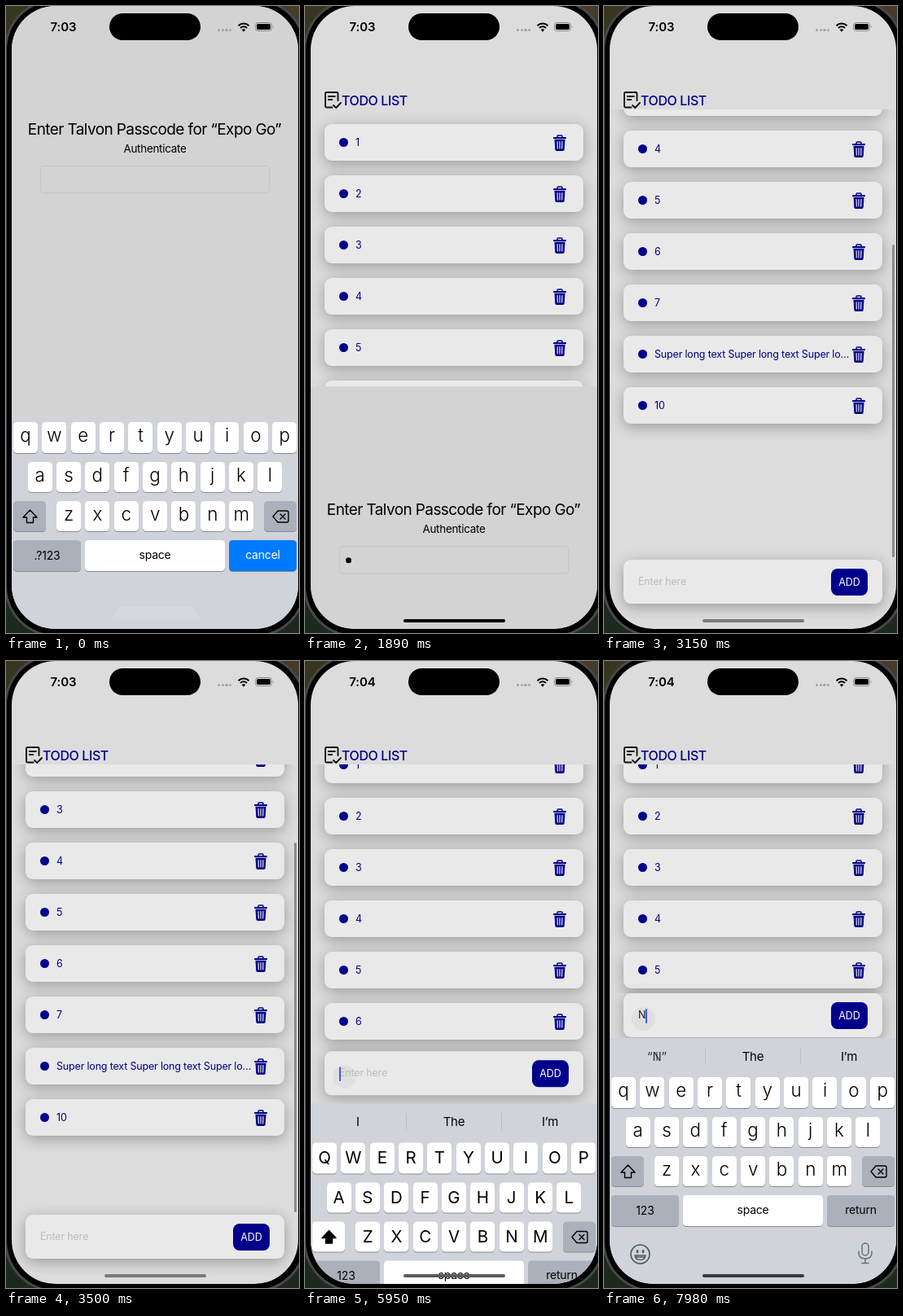
An HTML page for the animation above (8000 ms loop, 360 px wide and 770 px high).

```html
<!DOCTYPE html>
<html lang="en">
<head>
<meta charset="utf-8">
<title>Todo list</title>
<style>
html, body { margin: 0; width: 100%; height: 100%; overflow: hidden; }
body { font-family: Inter, Roboto, sans-serif; background: linear-gradient(100deg, #37351f, #4b3d2c); }
div, svg { position: absolute; box-sizing: border-box; white-space: nowrap; }
svg { overflow: visible; fill: none; stroke-linecap: round; stroke-linejoin: round; }
#stage { left: 0; top: 0; width: 360px; height: 770px; overflow: hidden; }
#ground { left: 0; top: 385px; width: 360px; height: 385px; background: #1c2a1d; }
#bezel { left: .5px; top: -6.5px; width: 365px; height: 778px; border-radius: 60px; background: #000; box-shadow: 0 0 0 3px #48484a; }
#screen { left: 7px; top: 0; width: 352px; height: 765px; border-radius: 54px; overflow: hidden; background: #dcdcdc; }
#view { left: -7px; top: 0; width: 360px; height: 770px; }
.mid { text-align: center; }
.card { border-radius: 9px; background: #e9e9e9; box-shadow: 0 4px 17px rgba(0,0,0,.3); }
.navy { color: #00008b; }
.small { font-size: 12.5px; letter-spacing: -.18px; }
.key { border-radius: 4.5px; background: #fff; box-shadow: 0 1px 0 #898b90; color: #000; text-align: center; font-size: 14px; letter-spacing: -.2px; }
.grey { background: #abb0bb; }
.blue { background: #007aff; color: #fff; }
.caret { background: #3d5fe0; border-radius: 1px; }
</style>
</head>
<body>
<div id="stage">
  <div id="ground"></div>
  <div id="bezel"></div>
  <div id="screen"><div id="view"></div></div>
</div>
<script>
const view = document.getElementById('view');

function box(parent, x, y, w, h, cls = '', text = '', css = '') {
  const d = document.createElement('div');
  d.className = cls;
  d.style.cssText = `left:${x}px;top:${y}px;width:${w}px;height:${h}px;line-height:${h}px;${css}`;
  d.textContent = text;
  parent.append(d);
  return d;
}

function icon(parent, x, y, w, h, body, attrs = '') {
  parent.insertAdjacentHTML('beforeend',
    `<svg style="left:${x}px;top:${y}px" width="${w}" height="${h}" viewBox="0 0 ${w} ${h}" ${attrs}>${body}</svg>`);
  return parent.lastElementChild;
}

const show = (node, on) => { node.style.display = on ? '' : 'none'; };
const shiftY = (node, y) => { node.style.transform = `translateY(${y}px)`; };
const clamp = v => Math.min(1, Math.max(0, v));
const span = (t, a, b) => clamp((t - a) / (b - a));
const smooth = p => p * p * (3 - 2 * p);
const easeOut = p => 1 - (1 - p) ** 3;
const mix = (a, b, p) => a + (b - a) * p;

function track(points, t) {
  let i = points.findIndex(p => p[0] > t);
  if (i === 0) return points[0][1];
  if (i < 0) return points[points.length - 1][1];
  const [t0, a] = points[i - 1], [t1, b] = points[i];
  return mix(a, b, (t - t0) / (t1 - t0));
}

// List
const LIST_TOP = 127, LIST_H = 553, PITCH = 63;
const allItems = ['1', '2', '3', '4', '5', '6', '7', 'Super long text Super long text Super lo…', '10'];
const fewerItems = allItems.filter(s => s !== '7');
const maxScroll = n => n * PITCH + 89 - LIST_H;

const TRASH = `<path d="M5 4V2Q5 .9 6 .9h4q1 0 1 1.100V4" stroke="#00008b" stroke-width="1.500"/>
<path d="M1 3h14a1 1 0 0 1 0 2.200H1A1 1 0 0 1 1 3zM1.500 6h13l-.8 12.200q-.1 1.800-1.800 1.800H4.100q-1.700 0-1.800-1.800z" fill="#00008b"/>
<path d="M5.100 8.500l.2 8.500M8 8.500V17M10.900 8.500l-.2 8.500" stroke="#e9e9e9" stroke-width="1.200"/>`;

const list = box(view, 0, LIST_TOP, 360, LIST_H, '', '', 'overflow:hidden');
const rows = box(list, 0, -LIST_TOP, 360, 770);
const cards = allItems.map((_, i) => {
  const card = box(rows, 24, 145 + i * PITCH, 318, 45, 'card');
  box(card, 18, 17, 11, 11, '', '', 'border-radius:50%;background:#00008b');
  return {
    card,
    label: box(card, 38, 0, 245, 45, 'navy small'),
    trash: icon(card, 281, 12.5, 16, 20, TRASH)
  };
});
const bar = box(view, 354, 0, 2.7, 0, '', '', 'border-radius:2px;background:#8b8b8b');

// Header
icon(view, 24, 105, 21, 21,
  '<path d="M16.500 11V2.500Q16.500 1 15 1H2.500Q1 1 1 2.500v15.500Q1 19.500 2.500 19.500h7M4.800 6h8M4.800 10h4.500M11 17l3.200 3L20 14"/>',
  'stroke="#111" stroke-width="1.900"');
box(view, 45, 104, 100, 24, 'navy', 'TODO LIST', 'font-size:16px;font-weight:500;letter-spacing:-.4px');

// Entry field
const entry = box(view, 24, 680, 318, 54, 'card');
const touch = box(entry, 10, 17, 29, 29, '', '', 'border-radius:50%;background:rgba(0,0,0,.04)');
const hint = box(entry, 18, 0, 100, 54, 'small', 'Enter here', 'color:#bcbcbc');
const typed = box(entry, 18, 0, 30, 54, 'small', 'N', 'color:#1c1c1c');
const caret = box(entry, 18, 18.5, 1.8, 18, 'caret');
box(entry, 255, 10.5, 45, 33, 'mid', 'ADD', 'font-size:12.5px;color:#fff;background:#00008b;border-radius:8px');

// Passcode sheet
const sheet = box(view, 0, 0, 360, 770, '', '', 'background:#d3d3d3');
box(sheet, 0, 138, 365, 28, 'mid', 'Enter Talvon Passcode for “Expo Go”', 'font-size:19px;letter-spacing:-.6px');
box(sheet, 0, 165, 366, 20, 'mid', 'Authenticate', 'font-size:13.4px;letter-spacing:-.25px');
box(sheet, 42, 196, 282, 34, '', '', 'border:1px solid #c5c5c5;border-radius:4px');
const codeCaret = box(sheet, 48.5, 203, 2, 19, 'caret');
const codeDot = box(sheet, 49.5, 209.5, 7, 7, '', '', 'border-radius:50%;background:#000');

// Keyboards
const SHIFT = 'M9.500 1L18 10h-4.500v6.500h-8V10H1z';
const letterRows = [['qwertyuiop', 9, 511], ['asdfghjkl', 26.5, 559.5], ['zxcvbnm', 62, 607.5]];

function keyboard({ top, upper, left, right, rightCls }) {
  const kb = box(view, 0, 0, 360, 770);
  box(kb, 0, top, 360, 800 - top, '', '', 'background:#d0d3da');
  const style = upper
    ? 'font-size:20.5px;line-height:38px'
    : 'font-size:22.4px;font-weight:300;line-height:31px';
  for (const [letters, x, y] of letterRows)
    [...letters].forEach((c, i) =>
      box(kb, x + i * 35.35, y, 30, 37.5, 'key', upper ? c.toUpperCase() : c, style));
  box(kb, 9, 607.5, 40, 37.5, upper ? 'key' : 'key grey');
  icon(kb, 19.5, 618, 19, 18, `<path d="${SHIFT}" fill="${upper ? '#000' : 'none'}"/>`, 'stroke="#000" stroke-width="1.400"');
  box(kb, 317, 607.5, 40, 37.5, 'key grey');
  icon(kb, 327, 618.5, 21, 16,
    '<path d="M7 1h11q2 0 2 2v10q0 2-2 2H7L1 8zM10 5l6 6M16 5l-6 6"/>', 'stroke="#000" stroke-width="1.400"');
  box(kb, 9, 656, 83, 37.5, 'key grey', left);
  box(kb, 97, 656, 172, 37.5, 'key', 'space', 'line-height:35px');
  box(kb, 274, 656, 83, 37.5, 'key ' + rightCls, right, 'line-height:36px');
  return kb;
}

function textKeyboard(upper) {
  const kb = keyboard({ top: 463, upper, left: '123', right: 'return', rightCls: 'grey' });
  const word = (x, s) => box(kb, x - 50, 474, 100, 24, 'mid', s, 'font-size:15px;letter-spacing:-.2px');
  kb.first = word(65, 'I');
  kb.quoted = word(65, '“N”');
  word(183, 'The');
  word(301, 'I’m');
  for (const x of [123.5, 241]) box(kb, x, 475, 1, 21, '', '', 'background:#babdc4');
  icon(kb, 32, 715.5, 25, 25,
    `<circle cx="12.500" cy="12.500" r="11.500"/><path d="M6 14h13q-.8 5.500-6.500 5.500T6 14zM7 16h11"/>
     <path d="M9 8.300v1.700M16 8.300v1.700" stroke-width="2.600"/>`, 'stroke="#555a62" stroke-width="1.700"');
  icon(kb, 312, 714, 18, 27,
    '<rect x="5" y="1" width="8" height="15" rx="4"/><path d="M1 11v2q0 7 8 7t8-7v-2M9 20v5.500M5 25.500h8"/>',
    'stroke="#6a6f78" stroke-width="1.500"');
  return kb;
}

const codeKeys = keyboard({ top: 505, upper: false, left: '.?123', right: 'cancel', rightCls: 'blue' });
icon(codeKeys, 130, 738, 109, 15, '<path d="M0 15L10 0h89l10 15z" fill="#d4d7dd"/>');
const upperKeys = textKeyboard(true);
const lowerKeys = textKeyboard(false);

// Status bar and system chrome
const clock = box(view, 40, 15, 61, 21, 'mid', '', 'font-size:15px;font-weight:600;letter-spacing:-.1px');
box(view, 127, 9, 112, 33, '', '', 'background:#000;border-radius:17px');
for (let i = 0; i < 4; i++)
  box(view, 260 + i * 4.7, 27.5, 3.4, 3.4, '', '', 'border-radius:50%;background:#a6a6a6');
icon(view, 283.5, 19.5, 16, 12,
  `<path d="M1.500 4.300a9.200 9.200 0 0 1 13 0M4 7a5.700 5.700 0 0 1 8 0" stroke="#000" stroke-width="2" stroke-linecap="butt"/>
   <path d="M8 11.700L5.600 9.100q2.400-1.800 4.800 0z" fill="#000"/>`);
icon(view, 306, 20, 24, 11,
  `<rect x=".5" y=".5" width="20" height="10" rx="3" stroke="#858585"/>
   <rect x="2" y="2" width="17" height="7" rx="1.800" fill="#000"/>
   <path d="M22 3.800q1.500 1.700 0 3.400z" fill="#858585"/>`);
const home = box(view, 120.5, 752.8, 125.5, 4.4, '', '', 'border-radius:3px');

const LOOP = 8000, STEP = 70;
const DELETE_AT = 4760, TYPE_AT = 7700;
const scrollPath = [[2870, 0], [2940, 14], [3010, 72], [3080, 139], [3150, 181], [3220, 177],
  [3290, 159], [3360, 139], [3430, 122], [3500, 111], [3570, 107], [3710, 104], [3850, 103]];
const blink = [[5740, 0], [5880, 1], [6580, 1], [6790, 0], [6930, 0], [7140, 1]];

function drawList(t, lift) {
  const items = t < DELETE_AT ? allItems : fewerItems;
  const n = items.length, max = maxScroll(n);
  const scroll = t < DELETE_AT ? track(scrollPath, t) : max;
  shiftY(rows, -scroll);
  list.style.height = LIST_H - lift + 'px';

  const pressed = t < DELETE_AT ? 6 : 5;
  const fade = t < 4480 ? 1 : mix(.2, 1, span(t, 4690, 5040));
  cards.forEach((c, i) => {
    show(c.card, i < n);
    c.label.textContent = items[i] || '';
    c.trash.style.opacity = i === pressed ? fade : 1;
  });

  const rail = 548, railTop = 129;
  const full = k => rail * LIST_H / (k * PITCH + 89);
  const len = t < DELETE_AT ? full(9) : mix(full(9), full(8), easeOut(span(t, 4690, 5040)));
  const over = Math.max(0, scroll - max);
  const at = railTop + (rail - len) * Math.min(1, scroll / max) + over;
  bar.style.top = at + 'px';
  bar.style.height = len - over + 'px';
  bar.style.opacity = t < 2940 ? 0 : 1 - span(t, 5740, 5950);
}

function drawSheet(t) {
  show(sheet, t < 2100);
  shiftY(sheet, 770 * smooth(span(t, 1627, 2087)));
  codeCaret.style.opacity = t < 980 ? span(t, 210, 350) : 0;
  show(codeDot, t >= 980);
  show(codeKeys, t < 1260);
  shiftY(codeKeys, 265 * smooth(span(t, 930, 1260)));
}

function drawEntry(t, rise) {
  const isTyped = t >= TYPE_AT;
  shiftY(entry, -272 * rise);
  show(touch, t >= 5740);
  show(hint, !isTyped);
  show(typed, isTyped);
  caret.style.left = (isTyped ? 27 : 18) + 'px';
  caret.style.opacity = track(blink, t);

  show(upperKeys, t >= 5740 && !isTyped);
  show(lowerKeys, isTyped);
  shiftY(upperKeys, 307 * (1 - rise));
  upperKeys.quoted.style.opacity = 0;
  const swap = span(t, 7770, 8050);
  lowerKeys.first.style.opacity = 1 - swap * .6;
  lowerKeys.quoted.style.opacity = swap;
}

function draw(now) {
  const t = Math.floor(now % LOOP / STEP) * STEP;
  const rise = easeOut(span(t, 5770, 6270));
  drawList(t, 272 * rise);
  drawSheet(t);
  drawEntry(t, rise);
  clock.textContent = t < 5880 ? '7:03' : '7:04';
  show(home, t >= 1050);
  const shade = track([[2170, 0], [2310, 122], [5740, 122], [6160, 58]], t);
  home.style.background = `rgb(${shade},${shade},${shade})`;
}

const start = performance.now();
function tick() {
  draw(performance.now() - start);
  requestAnimationFrame(tick);
}
tick();
</script>
</body>
</html>
```
